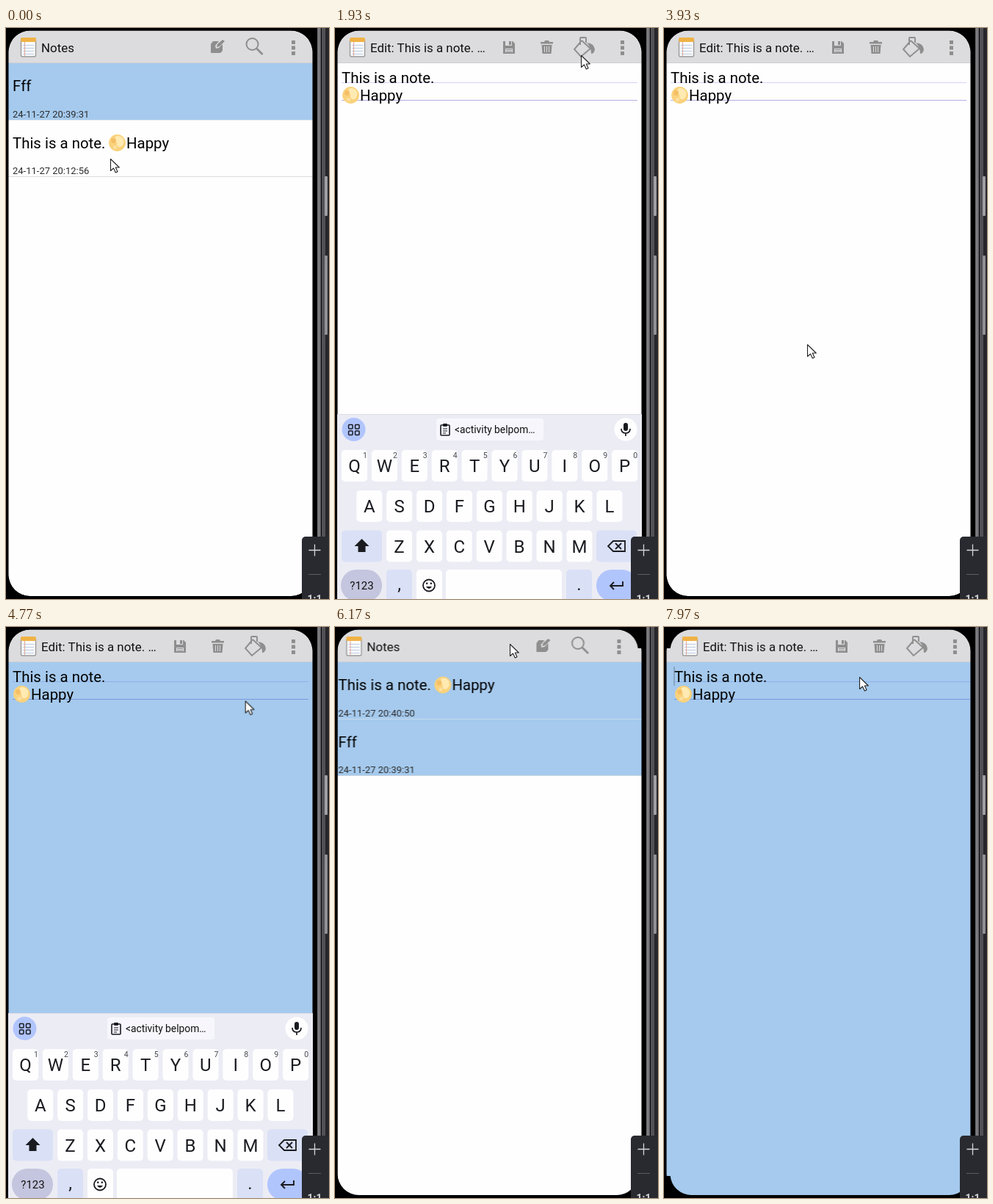
An HTML page that plays this animation: 440x778 px, repeating every 8 s.

```html
<!DOCTYPE html>
<html lang="en">
<head>
<meta charset="utf-8">
<title>Notes</title>
<style>
  html, body { margin: 0; width: 100%; height: 100%; overflow: hidden; background: #000; }
  svg { display: block; width: 100vw; height: 100vh; }
  text { font-family: Roboto, sans-serif; fill: #111; white-space: pre; }
  .title { font-size: 16.9px; }
  .body { font-size: 20.4px; fill: #000; }
  .date { font-size: 13px; fill: #2c2c2e; }
  .key { font-size: 24px; text-anchor: middle; fill: #1a1b20; }
  .hint { font-size: 10.5px; text-anchor: middle; fill: #45464f; }
  .icon { fill: #8e8e8e; }
  .line { fill: none; stroke: #8e8e8e; }

  .list, .list-shown, .editor, .editor-fade, .early, .late, .keyboard, .dialog, .caret, .pointer {
    animation: 8s linear infinite;
  }
  .list, .editor {
    animation-timing-function: linear(0, .03 8%, .4 16.7%, .62 19.7%, .72 22.3%, .86 31.8%, .965 56%, 1);
  }
  .list-shown, .early, .late, .caret { animation-timing-function: step-end; }
  .list { animation-name: list; }
  .list-shown { animation-name: list-shown; }
  .editor { animation-name: editor; }
  .editor-fade { animation-name: editor-fade; }
  .early { animation-name: early; }
  .late { animation-name: late; }
  .caret { animation-name: caret; }
  .dialog { animation-name: dialog; }
  .keyboard { animation-name: keyboard; animation-timing-function: cubic-bezier(.2, 0, .2, 1); }
  .pointer { animation-name: pointer; animation-timing-function: ease-in-out; }

  @keyframes list {
    0%, 7.5%, 80.6%, 100% { transform: translateX(0); }
    13.1%, 75% { transform: translateX(-41px); }
  }
  @keyframes list-shown {
    0%, 75% { opacity: 1; }
    9.2%, 99.2%, 100% { opacity: 0; }
  }
  @keyframes editor {
    0%, 7.5%, 80.6% { transform: translateX(41px); }
    13.1%, 75% { transform: translateX(0); }
    97.5% {
      transform: translateX(41px);
      animation-timing-function: linear(0, .03 18%, .44 37%, .8 50%, .95 71%, 1);
    }
    100% { transform: translateX(4px); }
  }
  @keyframes editor-fade {
    0%, 8.1%, 76.5%, 98.1% { opacity: 0; }
    9.2%, 75.4%, 99.2%, 100% { opacity: 1; }
  }
  @keyframes early { 0% { opacity: 1; } 50.6%, 100% { opacity: 0; } }
  @keyframes late { 0% { opacity: 0; } 50.6%, 100% { opacity: 1; } }
  @keyframes caret { 0% { opacity: 0; } 97.5%, 100% { opacity: 1; } }
  @keyframes dialog {
    0%, 31.5%, 45.6%, 100% { opacity: 0; }
    33.3%, 43.75% { opacity: 1; }
  }
  @keyframes keyboard {
    0%, 10%, 33.5%, 51%, 76.5%, 100% { transform: translateY(255px); }
    13.5%, 31.3%, 54%, 73.6% { transform: translateY(0); }
  }
  @keyframes pointer {
    0%, 8% { transform: translate(142px, 178px); }
    20% { transform: translate(334px, 44px); }
    24.1% { transform: translate(335px, 37px); }
    27%, 34.5% { transform: translate(337px, 27px); }
    41.5%, 44% { transform: translate(203px, 342px); }
    48.5%, 55% { transform: translate(195px, 431px); animation-timing-function: ease-in; }
    57% { transform: translate(280px, 370px); animation-timing-function: linear; }
    58.4% { transform: translate(314px, 242px); animation-timing-function: linear; }
    59.6% { transform: translate(326px, 102px); animation-timing-function: ease-out; }
    63% { transform: translate(306px, 22px); }
    68%, 80% { transform: translate(238px, 23px); }
    90%, 100% { transform: translate(266px, 68px); }
  }
</style>
</head>
<body>
<svg id="stage" viewBox="0 0 440 778" preserveAspectRatio="none"></svg>
<script>
  const WHITE = '#fefeff', BLUE = '#a5caed', BAR = '#dcdcde', ICON = '#8e8e8e';

  const rect = (x, y, w, h, fill, r = 0, more = '') =>
    `<rect x="${x}" y="${y}" width="${w}" height="${h}" rx="${r}" fill="${fill}" ${more}/>`;
  const text = (cls, x, y, s, more = '') => `<text class="${cls}" x="${x}" y="${y}" ${more}>${s}</text>`;
  const path = (d, cls, more = '') => `<path d="${d}" class="${cls}" ${more}/>`;
  const stroke = (d, color, width) => path(d, '', `fill="none" stroke="${color}" stroke-width="${width}"`);
  const group = (cls, ...parts) => `<g class="${cls}">${parts.join('')}</g>`;
  const wide = (y, h, fill) => rect(-60, y, 540, h, fill);

  const moon = (x, y) => `<g transform="translate(${x} ${y})">
    <circle r="11.4" fill="#fad27c"/>
    <path d="M-2-9q8-2 11 6q0 8-6 9q-5-2-3-6q-5-3-2-9z" fill="#ffeab2"/>
    <circle cx="-5" cy="-3" r="3.4" fill="#f5bf66"/><circle cx="-3" cy="6" r="2.5" fill="#fde0a0"/></g>`;

  const notepad = rect(20.5, 15, 20, 24, '#fafafa', 2, 'stroke="#9a9a9c" stroke-width="1.4"')
    + rect(20, 13, 21, 6, '#efb246', 2)
    + stroke('M23 23.5h15M23 27.5h15M23 31.5h15M23 35.5h15', '#bccbe2', 1)
    + stroke('M25.5 19v19', '#e0a596', 1);

  const dots = [17, 24.5, 32].map(y => rect(389, y, 5, 5, ICON)).join('');
  const appBar = (title, icons) => wide(0, 47, BAR) + wide(47, 1, '#cfcfd2')
    + notepad + text('title', 48, 33, title) + icons + dots;

  const listIcons = path('M279 22l3-4h8l-5 6 1 4 4-1 5-5v9l-3 3h-13z', 'icon')
    + path('M287 26l1-4 7-6 3 2-7 7z', 'icon')
    + '<circle cx="335.5" cy="22" r="8" class="line" stroke-width="2"/>'
    + path('M341.5 28l8 8', 'line', 'stroke-width="2.6"');

  const editIcons = path('M229 18h13l3 3v14h-16zM232 18v6h9v-6zM232 28v5h10v-5z', 'icon', 'fill-rule="evenodd"')
    + path('M237 18h3v5h-3zM233 29h8v1h-8zM233 31.5h8v1h-8z', 'icon')
    + path('M280 19h5l1-2h5l1 2h5v2.5h-17zM281.5 23h14l-1 12h-12z', 'icon')
    + stroke('M285.5 25v8M288.5 25v8M291.5 25v8', BAR, 1)
    + path('M326 29l8-9V14q0-1 1-1h6q1 0 1 1v6M336 17l12 11-13 11-9-10 10-12M334 14v9', 'line', 'stroke-width="1.9"')
    + path('M343 20q10 1 11 9q-1 6-5 6q0-9-6-15z', 'icon');

  const longNote = (y, date) => text('body', 9, y, 'This is a note.')
    + moon(151.5, y - 7) + text('body', 164, y, 'Happy') + text('date', 9, y + 35.5, date);
  const shortNote = (y, date) => text('body', 9, y, 'Fff') + text('date', 9, y + 35.5, date);

  const page = inner => `<g clip-path="url(#page)">${inner}</g>`;

  const list = group('list-shown', group('list', page(
    wide(0, 778, WHITE) + wide(48, 77, BLUE)
    + group('early', wide(125, 1, '#dce4ec'), wide(202, 1, '#dcdce0'),
        shortNote(86, '24-11-27 20:39:31'), longNote(163.5, '24-11-27 20:12:56'))
    + group('late', wide(126, 77, BLUE), wide(125, 1, '#c6dbee'), wide(202, 1, '#cdd6e0'),
        longNote(86, '24-11-27 20:40:50'), shortNote(163.5, '24-11-27 20:39:31'))
    + appBar('Notes', listIcons))));

  const rules = (a, b) => rect(9, 74, 403, 1, a) + rect(9, 98, 403, 1, b);
  const editor = group('editor', group('editor-fade', page(
    wide(0, 778, WHITE) + rules('#d6d2f6', '#b3aee2')
    + group('late', wide(48, 730, BLUE), rules('#8db0ee', '#7c98de'))
    + group('caret', rect(8.5, 54, 1, 26, '#6d8499'))
    + text('body', 9, 75, 'This is a note.') + moon(21.5, 91.5) + text('body', 34, 98.5, 'Happy')
    + appBar('Edit: This is a note. …', editIcons))));

  const swatches = ['#fff', '#fdef90', '#6dc1ed', '#94e49f', '#f19696'];
  const dialog = group('dialog', rect(0, 0, 440, 778, '#000', 0, 'opacity=".35"'),
    rect(70, 256, 281, 108, '#444', 2, 'filter="url(#shadow)"'),
    rect(70, 255, 281, 62, '#f3f3f3', 2), rect(70, 315, 281, 2, '#33b5e5'),
    text('body', 85, 294, 'Select Color', 'style="fill:#33b5e5"'),
    ...swatches.map((c, i) => rect(70 + 56.2 * i, 317, 56.2, 46, c)));

  const STEP = 40.9, SIDE_KEY = '#dae1f6', ACCENT = '#b1c5fd', INK = '#1a1b20';
  const keyRow = (letters, x0, y, hints) => [...letters].map((c, i) => {
    const x = x0 + STEP * i;
    return rect(x - 17.5, y, 35, 43, WHITE, 5) + text('key', x, y + 30, c)
      + (hints ? text('hint', x + 14.5, y + 11, (i + 1) % 10) : '');
  }).join('');

  const keyboard = group('keyboard',
    rect(0, 527, 440, 251, '#ececf5'), rect(0, 526, 440, 1, '#dcdce4'),
    `<circle cx="25.5" cy="547" r="16" fill="${ACCENT}"/>`,
    [18.5, 27.5].map(x => [540.5, 549].map(y =>
      rect(x, y, 5.5, 5.5, 'none', 1, `stroke="${INK}" stroke-width="1.5"`)).join('')).join(''),
    rect(138, 532, 146, 30, '#f6f6fc', 4),
    rect(144, 541, 12, 14, 'none', 1, `stroke="${INK}" stroke-width="1.6"`), rect(147, 539, 6, 4, INK, 1),
    stroke('M147 546h6M147 549h6M147 552h4', INK, 1.2),
    text('', 163, 552, '&lt;activity belpom…', 'font-size="13.8"'),
    `<circle cx="396" cy="547" r="15.5" fill="${WHITE}"/>`, rect(393, 538, 6, 11, INK, 3),
    stroke('M390 546q0 6 6 6t6-6M396 552v4', INK, 1.7),
    keyRow('QWERTYUIOP', 26.5, 575, true), keyRow('ASDFGHJKL', 46.8, 630), keyRow('ZXCVBNM', 87.5, 684.5),
    rect(9, 684.5, 55, 43, SIDE_KEY, 5), path('M36.5 696l10 10h-5v8h-10v-8h-5z', '', `fill="${INK}"`),
    rect(356, 684.5, 55, 43, SIDE_KEY, 5),
    stroke('M379 699h16v14h-16l-7-7zM382 702l8 8M390 702l-8 8', INK, 1.8),
    rect(8, 738, 56, 43, '#c4c5de', 21), text('', 36.5, 765, '?123', 'font-size="15" text-anchor="middle"'),
    rect(70, 738, 35, 43, SIDE_KEY, 5), text('key', 87.5, 766, ','),
    rect(111, 738, 35, 43, WHITE, 5),
    `<circle cx="128" cy="759.5" r="8" fill="none" stroke="${INK}" stroke-width="1.8"/>`,
    path('M124 761q4 6 8 0z', '', `fill="${INK}"`), rect(124, 755.5, 2.4, 2.6, INK, 1), rect(129.6, 755.5, 2.4, 2.6, INK, 1),
    rect(151, 738, 158, 43, WHITE, 5),
    rect(315, 738, 35, 43, SIDE_KEY, 5), text('key', 332.5, 766, '.'),
    rect(356, 738, 56, 43, ACCENT, 21),
    stroke('M392 754v6h-17M380 755l-5 5 5 5', INK, 1.9));

  const bezel = rect(424, 0, 5, 778, '#6c6c70') + rect(425.5, 0, 1.5, 778, '#828286')
    + rect(430, 0, 5, 778, '#525256') + rect(435, 0, 5, 778, '#27272b')
    + rect(434, 202, 4, 54, '#a0a0a4', 1) + rect(434, 310, 4, 108, '#919195', 1);
  const zoomBar = rect(403, 693, 45, 95, '#292a30', 5)
    + stroke('M412.5 711.5h16M420.5 703.5v16', '#d6d6da', 1.3)
    + rect(412, 744, 17, 1, '#5c5d64')
    + text('', 420.5, 783, '1:1', 'font-size="14" font-weight="700" text-anchor="middle" style="fill:#cfcfd4"');

  const pointer = group('pointer', path('M.5.5v16l4-3.5 2.8 6 2.7-1.2-2.7-5.8h5z', '',
    'fill="#fff" stroke="#222" stroke-width="1.1" stroke-linejoin="round"'));

  const SCREEN = '<rect x="3.5" y="3.5" width="414" height="770.5" rx="29"/>';
  document.getElementById('stage').innerHTML = `<defs>
    <clipPath id="screen">${SCREEN}</clipPath>
    <clipPath id="page">${SCREEN}<rect x="-60" y="29" width="540" height="719"/></clipPath>
    <clipPath id="panel"><rect x="3.5" y="4" width="414" height="774"/></clipPath>
    <filter id="shadow" x="-10%" y="-20%" width="120%" height="140%"><feGaussianBlur stdDeviation="3"/></filter>
    </defs>` + rect(0, 0, 440, 778, '#000') + bezel
    + `<g clip-path="url(#screen)">${list}${editor}</g><g clip-path="url(#panel)">${keyboard}</g>`
    + `<g clip-path="url(#screen)">${dialog}</g>` + zoomBar + pointer;
</script>
</body>
</html>
```
